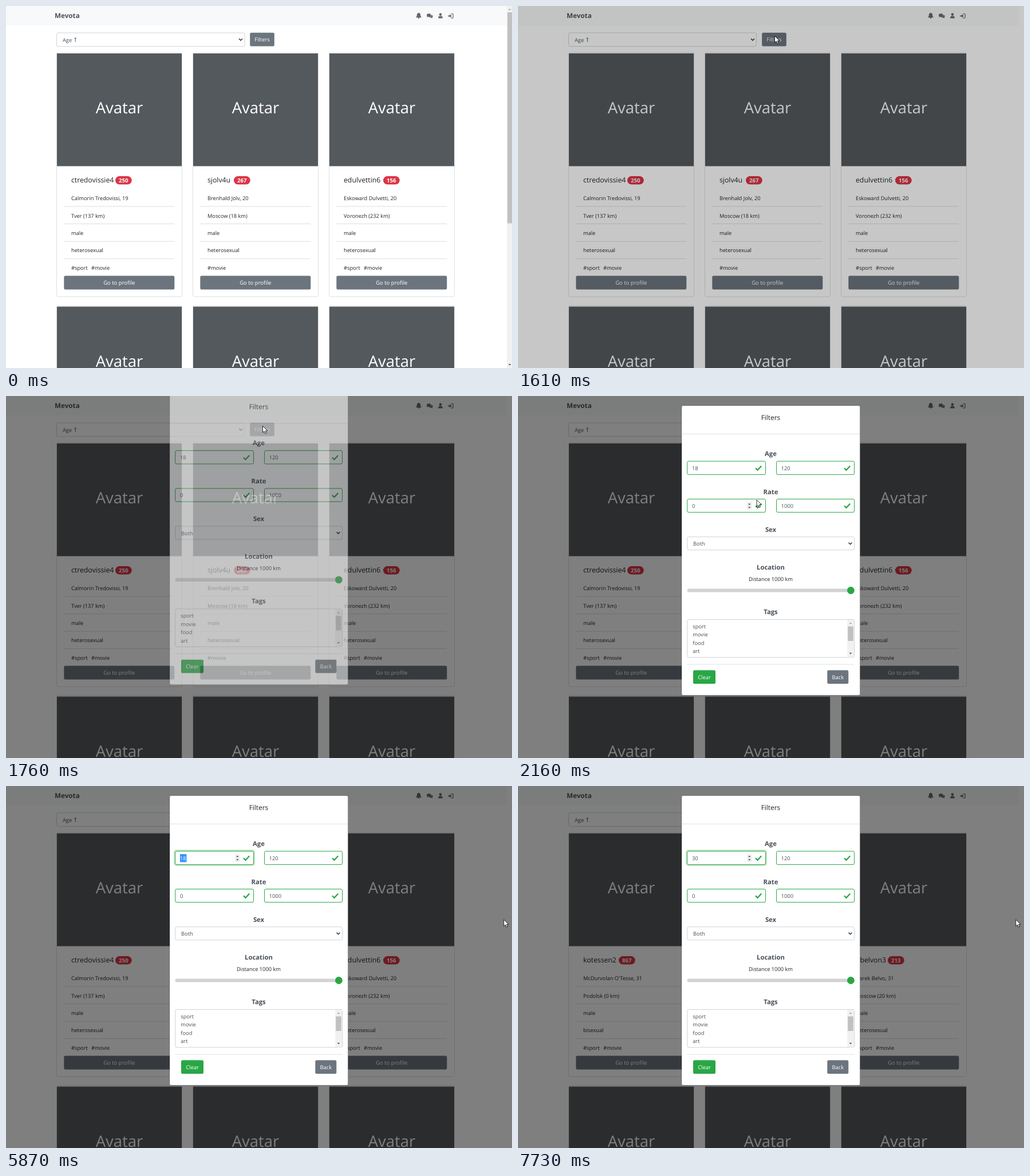
Write an HTML page that moves like this. It is 884 px wide and 634 px high and loops after 8000 ms.

```html
<!DOCTYPE html>
<html lang="en">
<head>
<meta charset="utf-8">
<title>Profile search</title>
<style>
  html, body { margin: 0; width: 100%; height: 100%; overflow: hidden; background: #fff; }
  svg { display: block; width: 100vw; height: 100vh; }
  text { font-family: "Open Sans", "Noto Sans", sans-serif; text-rendering: geometricPrecision; white-space: pre; }
</style>
</head>
<body>
<svg id="stage" viewBox="0 0 884 634" preserveAspectRatio="none"></svg>
<script>
const LOOP = 8000;
const INK = '#212529', SOFT = '#495057', GREY = '#6c757d', GREEN = '#28a745', RED = '#dc3545';
const FIELD = '#ced4da', LINE = '#dfdfdf';

// Drawing helpers
const text = (x, y, str, { size = 9.25, fill = INK, weight = 400, anchor = 'start', id = '' } = {}) =>
  `<text id="${id}" x="${x}" y="${y}" font-size="${size}" fill="${fill}" font-weight="${weight}" text-anchor="${anchor}">${str}</text>`;
const rect = (x, y, w, h, fill, extra = '') =>
  `<rect x="${x}" y="${y}" width="${w}" height="${h}" fill="${fill}" ${extra}/>`;
const path = (d, fill, extra = '') => `<path d="${d}" fill="${fill}" ${extra}/>`;
const rule = (x1, x2, y, color = LINE) => path(`M${x1} ${y}H${x2}`, 'none', `stroke="${color}"`);
const group = (id, body, extra = '') => `<g id="${id}" ${extra}>${body}</g>`;
const box = (x, y, w, h, stroke, id = '') =>
  rect(x, y, w, h, '#fff', `id="${id}" rx="2.5" stroke="${stroke}"`);
const button = (x, y, w, h, fill, label, size = 9.4) =>
  rect(x, y, w, h, fill, 'rx="2.5"') +
  text(x + w / 2, y + 15.5, label, { size, fill: '#fff', anchor: 'middle' });
const chevron = (x, y) =>
  path(`M${x - 2.9} ${y - 1.4}l2.9 2.9 2.9-2.9`, 'none', 'stroke="#333" stroke-width="1.6"');
const triangle = (x, y, r, dir, fill) => path(`M${x - r} ${y}h${2 * r}l${-r} ${dir * r}z`, fill);

// Page
const icons = group('icons',
  path('M721 12c-2.6.4-3.2 2.5-3.2 4.2 0 1.6-.6 2.3-1.3 3.1v.9h9v-.9c-.7-.8-1.3-1.5-1.3-3.1 0-1.7-.6-3.8-3.2-4.2z') +
  '<circle cx="721" cy="20.8" r="1.2"/>' +
  '<ellipse cx="738.8" cy="16.2" rx="3.8" ry="2.9"/>' +
  path('M735.3 19.8l1.2-2.2 2 1.2zM743.2 15.4c3.3 1 2.9 3.4 1.4 4.3l.9 1.7-2.4-1c-1.6.3-3.1-.2-3.9-1 2.6-.2 4.2-1.7 4-4z') +
  '<circle cx="759" cy="14.8" r="2.3"/>' +
  path('M755.3 21.5v-1.2c0-1.8 1-2.8 2.4-2.8h2.6c1.4 0 2.4 1 2.4 2.8v1.2z') +
  path('M772.3 16.4h3v-2.2l3.4 3.2-3.4 3.2v-2.2h-3z') +
  path('M777.5 13.6h2.4q1.2 0 1.2 1.2v5.2q0 1.2-1.2 1.2h-2.4', 'none', 'stroke="#66696c" stroke-width="1.2"'),
  'fill="#66696c"').replace(/fill="undefined"/g, '');

const COLUMNS = [0, 238, 476];
const ROW_PITCH = 443.5;

const frame = (dx, dy) =>
  `<g transform="translate(${dx} ${dy})">` +
  rect(88.5, 81.5, 219, 427.5, '#fff', `rx="2.5" stroke="${LINE}"`) +
  rect(89, 83, 218, 197.5, '#54595d') +
  text(198, 188, 'Avatar', { size: 27.5, fill: '#fff', anchor: 'middle' }) +
  [351, 381.5, 412.3, 442.6].map(y => rule(101, 294, y)).join('') +
  button(101.3, 472.5, 193, 24, GREY, 'Go to profile', 9.5) + '</g>';

const profile = ([login, rate, badgeX, ...facts], i) =>
  `<g transform="translate(${COLUMNS[i]} 0)">` +
  text(114, 309, login, { size: 12.25 }) +
  rect(badgeX, 298, 28.7, 14.6, RED, 'rx="7.3"') +
  text(badgeX + 14.3, 308.8, rate, { size: 9.7, fill: '#fff', weight: 700, anchor: 'middle' }) +
  facts.map((fact, row) => text(114, 340.3 + row * 30.3, fact)).join('') + '</g>';

const tags = (dx, both) => both
  ? text(114 + dx, 461.5, '#sport') + text(149 + dx, 461.5, '#movie')
  : text(114 + dx, 461.5, '#movie');

const before = [
  ['ctredovissie4', 250, 191, 'Calmorin Tredovissi, 19', 'Tver (137 km)', 'male', 'heterosexual'],
  ['sjolv4u', 267, 160, 'Brenhald Jolv, 20', 'Moscow (18 km)', 'male', 'heterosexual'],
  ['edulvettin6', 156, 183, 'Eskoward Dulvetti, 20', 'Voronezh (232 km)', 'male', 'heterosexual'],
];
const after = [
  ['kotessen2', 867, 176, "McDurvolan O'Tesse, 31", 'Podolsk (0 km)', 'male', 'bisexual'],
  before[1],
  ['obelvon3', 213, 170, 'Osrek Belvo, 31', 'Moscow (20 km)', 'male', 'heterosexual'],
];

const page =
  rect(0, 0, 875, 34, '#f8f9fa') +
  text(85, 21.3, 'Mevota', { size: 11.7, fill: '#4f5256', weight: 700 }) + icons +
  box(88.5, 47, 328.5, 23.8, FIELD, 'sort') + text(99, 62.5, 'Age', { fill: SOFT }) +
  path('M121.3 63v-7.4M119.7 57.4l1.6-1.8 1.6 1.8', 'none', `stroke="${SOFT}" stroke-width=".9"`) +
  chevron(410, 58.7) +
  button(426.2, 46.8, 42.6, 23.6, GREY, 'Filters') +
  [0, ROW_PITCH].map(dy => COLUMNS.map(dx => frame(dx, dy)).join('')).join('') +
  COLUMNS.map((dx, i) => tags(dx, i !== 1)).join('') +
  group('before', before.map(profile).join('')) +
  group('after', after.map(profile).join('')) +
  group('scrollbar',
    rect(875, 0, 9, 634, '#f1f1f1') + rect(876, 11, 8, 369.5, '#c1c1c1') +
    triangle(880, 7, 2.4, -1, '#a3a3a3') + triangle(880, 627, 2.4, 1, '#505050'));

// Dialog
const check = (x, y, id = '') =>
  path(`M${x - 5} ${y + .3}l3.5 3.5 6.7-7.2`, 'none', `id="${id}" stroke="${GREEN}" stroke-width="2.2"`);
const heading = (y, str) =>
  text(441.5, y, str, { size: 11.3, fill: SOFT, weight: 700, anchor: 'middle' });
const value = (x, y, str, id) => text(x, y, str, { fill: SOFT, size: 9.3, id });
const spinner = (id, y) => group(id,
  rect(400, y - 6.7, 8.7, 13.4, '#efefef') +
  triangle(404.3, y - 2, 2.2, -1, '#404040') + triangle(404.3, y + 2, 2.2, 1, '#404040'));

const modal =
  rect(286, 17, 311.5, 507, '#fff', 'id="sheet" rx="2.5" stroke="#000" stroke-opacity=".2"') +
  text(441.5, 41.6, 'Filters', { size: 11.9, weight: 500, anchor: 'middle' }) +
  rule(286.5, 597, 66.5, '#dee2e6') +
  heading(105, 'Age') +
  rect(294.3, 112.8, 139.4, 26, 'none', 'id="ring" rx="3.5" stroke-width="2.4" stroke-opacity=".3"') +
  box(295.7, 114.2, 136.8, 23.4, GREEN, 'ageBox') + box(451.5, 114.2, 136, 23.4, GREEN) +
  rect(304, 119.3, 11.4, 14, '#3390ff', 'id="selection"') +
  value(304, 130, '18', 'age') + value(459.7, 130, '120') +
  rect(0, 119, 1, 14, '#000', 'id="caret"') +
  spinner('ageSpin', 126.2) + check(420, 126, 'ageOk') + check(575, 126) +
  group('ageBad', `<circle cx="420" cy="126" r="5" fill="none" stroke="${RED}"/>` +
    path('M420 123v3.6M420 128v1', 'none', `stroke="${RED}"`)) +
  group('below',
    heading(171.6, 'Rate') +
    box(295.7, 180.5, 136.8, 23.2, GREEN) + box(451.5, 180.5, 136, 23.2, GREEN) +
    value(304, 196, '0') + value(459.7, 196, '1000') +
    spinner('rateSpin', 192.2) + check(420, 192) + check(575, 192) +
    heading(238, 'Sex') +
    box(295.7, 246.7, 291.8, 23, FIELD) + value(306, 262.2, 'Both') + chevron(580.5, 258.2) +
    heading(304, 'Location') +
    text(441.5, 323.7, 'Distance 1000 km', { size: 9.3, anchor: 'middle' }) +
    rect(295.5, 337.4, 291.5, 6.2, '#d3d3d3', 'rx="3.1"') +
    `<circle cx="581.4" cy="340.5" r="6.4" fill="${GREEN}"/>` +
    heading(382, 'Tags') +
    box(295.7, 391.5, 291.8, 66.3, FIELD) +
    ['sport', 'movie', 'food', 'art'].map((tag, i) => value(305.3, 406.6 + i * 14.6, tag)).join('') +
    rect(575.3, 392, 11.4, 65.3, '#f1f1f1') + rect(576.2, 403.5, 9.6, 25.5, '#c1c1c1') +
    triangle(581, 399, 2.4, -1, '#a3a3a3') + triangle(581, 449.8, 2.4, 1, '#505050') +
    rule(295.5, 587.5, 470, '#dee2e6') +
    button(306, 480.3, 39, 23.6, GREEN, 'Clear') + button(540.3, 480.3, 37, 23.6, GREY, 'Back'));

document.getElementById('stage').innerHTML =
  page + rect(0, 0, 884, 634, '#000', 'id="shade"') + group('modal', modal) +
  group('arrow', path('M0 0V11.6L2.7 9.1 4.5 13.2 6.5 12.3 4.7 8.4H8.4Z', '#fff',
    'stroke="#000" stroke-width=".8"')) +
  group('beam', path('M-2.6-5.7H-.5L0-5.2.5-5.7H2.6M0-5.2V5.2M-2.6 5.7H-.5L0 5.2.5 5.7H2.6', 'none',
    'stroke="#222" stroke-width="1"'));

// Timeline: rows of [start, ...values], each held until the next row
const smooth = p => p * p * (3 - 2 * p);
const glide = (start, end, count, [x1, y1], [x2, y2], shape) =>
  Array.from({ length: count }, (_, i) => {
    const p = smooth((i + 1) / count);
    return [start + (end - start) * i / (count - 1), x1 + (x2 - x1) * p, y1 + (y2 - y1) * p, shape];
  });

const pointer = [
  [0, 0, 0, ''],
  ...glide(210, 980, 11, [829, 584], [436, 50], 'arrow'),
  [1060, 459, 55, 'arrow'], [1130, 448.5, 52.5, 'arrow'],
  ...glide(1830, 2070, 4, [448.5, 52.5], [420, 172], 'arrow'),
  [2160, 417, 182, 'arrow'],
  ...glide(3090, 3240, 3, [417, 182], [385, 142], 'arrow'),
  [3310, 376, 126, 'beam'], [3390, 373, 122, 'beam'],
  [3940, 371, 122, 'beam'], [4020, 370.5, 121.5, 'beam'], [4870, 370, 122.5, 'beam'],
  ...glide(5020, 5480, 7, [370, 122.5], [294.5, 134.5], 'beam'),
  [5630, 315, 134, 'beam'], [5710, 438, 123, 'arrow'],
  [5790, 760, 200, 'arrow'], [5870, 869.7, 234, 'arrow'],
];
const shade = [[0, 0], [1610, .22], [1680, .45], [1760, .5]];
const sheet = [[0, 0, 0], [1760, .55, -18.6], [1830, 1, -9.9], [1910, 1, -2.6], [1990, 1, 0]];
const focus = [[0, 0], [4480, .5], [4560, 1]];
const age = [[0, '18'], [7030, '3'], [7270, '30']];
const caret = [[0, 0], [4480, 315], [5020, 0], [7030, 309.7], [7270, 315], [7730, 0]];

const at = (rows, t) => rows.findLast(row => row[0] <= t).slice(1);
const el = id => document.getElementById(id);
const set = (id, attrs) => Object.entries(attrs).forEach(([key, val]) => el(id).setAttribute(key, val));
const show = (id, on) => set(id, { visibility: on ? 'inherit' : 'hidden' });
const during = (t, start, end = LOOP) => t >= start && t < end;

function render(t) {
  const locked = during(t, 1530);
  show('scrollbar', !locked);
  set('sort', { width: locked ? 327.8 : 328.5 });
  show('before', t < 7500);
  show('after', t >= 7500);

  set('shade', { opacity: at(shade, t)[0] });
  const [opacity, dy] = at(sheet, t);
  set('modal', { opacity, transform: `translate(0 ${dy})` });

  const invalid = during(t, 7030, 7270);
  const color = invalid ? RED : GREEN;
  const grow = invalid ? 4 : 0;
  set('sheet', { height: 507 + grow });
  set('below', { transform: `translate(0 ${grow})` });
  set('ageBox', { stroke: color });
  set('ring', { stroke: color, opacity: at(focus, t)[0] });
  show('ageOk', !invalid);
  show('ageBad', invalid);
  show('ageSpin', during(t, 3310));
  show('rateSpin', during(t, 2160, 3170));

  const selected = during(t, 5400, 7030);
  show('selection', selected);
  set('age', { fill: selected ? '#fff' : SOFT });
  el('age').textContent = at(age, t)[0];
  const [caretX] = at(caret, t);
  set('caret', { x: caretX });
  show('caret', caretX > 0);

  const [x, y, shape] = at(pointer, t);
  for (const id of ['arrow', 'beam']) {
    show(id, id === shape);
    set(id, { transform: `translate(${x} ${y})` });
  }
}

const started = performance.now();
function tick() {
  render((performance.now() - started) % LOOP);
  requestAnimationFrame(tick);
}
tick();
</script>
</body>
</html>
```
